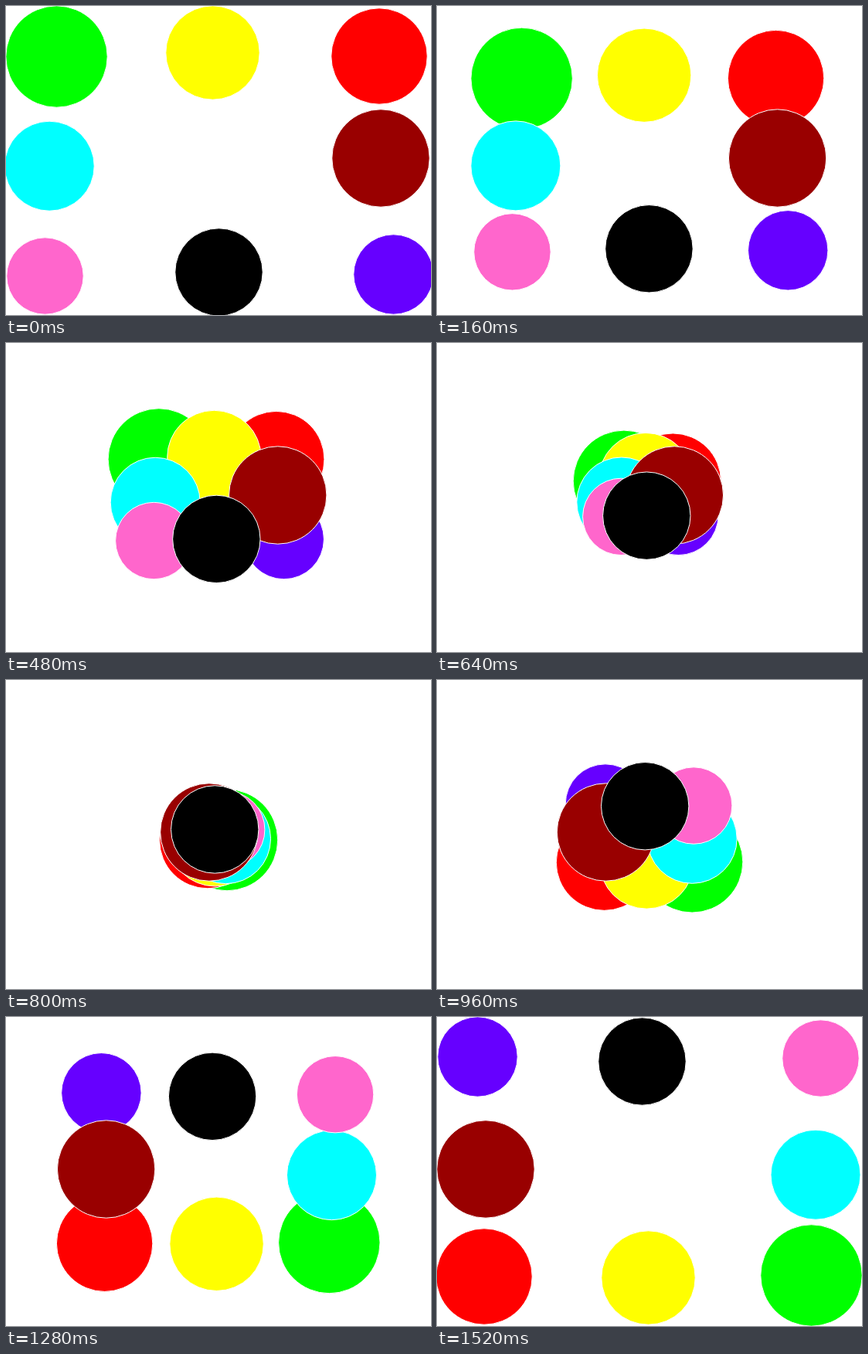
These frames come from a looping animation (550 by 400 pixels, 1600 ms). An HTML page with a canvas:

```html
<!DOCTYPE html>
<html lang="en">
<head>
<meta charset="utf-8">
<title>Crossing circles</title>
<style>
  html, body { margin: 0; width: 100%; height: 100%; overflow: hidden; background: #fff; }
  canvas { display: block; }
</style>
</head>
<body>
<canvas id="stage" width="550" height="400"></canvas>
<script>
const ctx = document.getElementById('stage').getContext('2d');
const STEPS = 20, STEP_MS = 80;

// Back to front: colour, radius, start x, y, end x, y
const circles = [
  ['#00ff00', 65.2, 65.5, 65.5, 484.5, 334.5],
  ['#ff0000', 61.7, 483, 65, 61, 336],
  ['#ffff00', 60.2, 267.5, 60.5, 273.5, 337.5],
  ['#6600ff', 51.2, 501.5, 347.5, 52.5, 51.5],
  ['#00ffff', 57.5, 56.2, 207.2, 490, 204.2],
  ['#ff66cc', 49.2, 50.5, 349.5, 496.5, 53.5],
  ['#990000', 62.7, 485, 197, 63, 197],
  ['#000000', 56.2, 275.5, 344.5, 265.5, 57.5],
];

function draw(progress) {
  ctx.fillStyle = '#fff';
  ctx.fillRect(0, 0, 550, 400);
  ctx.strokeStyle = '#fff';
  ctx.lineWidth = 1;
  for (const [color, radius, x0, y0, x1, y1] of circles) {
    ctx.beginPath();
    ctx.arc(x0 + (x1 - x0) * progress, y0 + (y1 - y0) * progress, radius + 0.5, 0, Math.PI * 2);
    ctx.fillStyle = color;
    ctx.fill();
    ctx.stroke();
  }
}

function tick() {
  const step = Math.floor(performance.now() / STEP_MS) % STEPS;
  draw(step / (STEPS - 1));
  requestAnimationFrame(tick);
}
tick();
</script>
</body>
</html>
```
